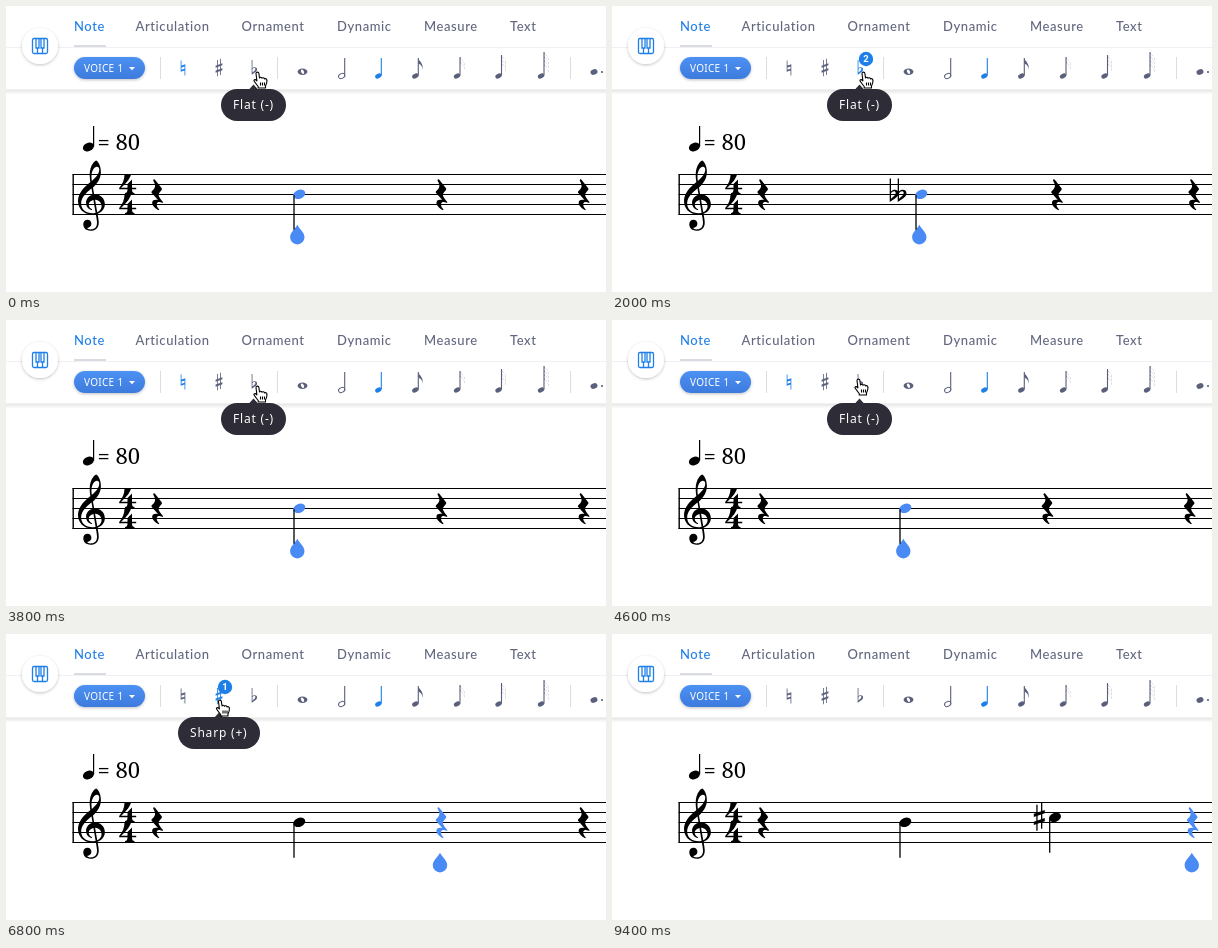
An HTML page that plays this animation: 600x286 px, repeating every 9.8 s.

```html
<!DOCTYPE html>
<html lang="en">
<head>
<meta charset="utf-8">
<style>
html, body { margin: 0; width: 100%; height: 100%; overflow: hidden; background: #fff; }
svg { display: block; width: 600px; height: 286px; }
.tab { font: 500 13px Lato, sans-serif; letter-spacing: .6px; }
.voice { font: 10px "Noto Sans", sans-serif; letter-spacing: .3px; fill: #fff; }
.tip { font: 12px "Noto Sans", sans-serif; letter-spacing: .8px; fill: #fff; }
.badge { font: bold 9.5px Roboto, sans-serif; fill: #fff; text-anchor: middle; }
.tempo { font: 22px "Noto Serif", serif; }
</style>
</head>
<body>
<svg id="stage" viewBox="0 0 600 286">
  <defs>
    <linearGradient id="pill" x2="0" y2="1"><stop stop-color="#4c91f3"/><stop offset="1" stop-color="#3d7bdd"/></linearGradient>
    <linearGradient id="shade" x2="0" y2="1"><stop stop-color="#000" stop-opacity=".11"/><stop offset="1" stop-color="#000" stop-opacity="0"/></linearGradient>
    <filter id="soft" x="-40%" y="-40%" width="180%" height="180%"><feDropShadow dx="0" dy="1" stdDeviation="1.8" flood-opacity=".25"/></filter>
    <path id="clef" fill-rule="evenodd" d="M364 -252c-245 0 -364 165 -364 339c0 202 153 345 297 464c12 10 11 12 9 24c-7 41 -14 106 -14 164c0 104 24 229 98 311c20 22 51 48 65 48c11 0 37 -28 52 -50c41 -60 65 -146 65 -233c0 -153 -82 -280 -190 -381c-6 -6 -8 -7 -6 -19l25 -145c3 -18 3 -18 29 -18c147 0 241 -113 241 -241c0 -113 -67 -198 -168 -238c-14 -6 -15 -5 -13 -17c11 -62 29 -157 29 -214c0 -170 -130 -200 -197 -200c-151 0 -190 98 -190 163c0 62 40 115 107 115c61 0 96 -47 96 -102c0 -58 -36 -85 -67 -94c-23 -7 -32 -10 -32 -17c0 -13 26 -29 80 -29c59 0 159 18 159 166c0 47 -15 134 -27 201c-2 12 -4 11 -15 9c-20 -4 -46 -6 -69 -6zM80 20c0 -139 113 -236 288 -236c20 0 40 2 56 5c15 3 16 3 14 14l-50 298c-2 11 -4 12 -20 8c-61 -17 -100 -60 -100 -117c0 -46 30 -89 72 -107c7 -3 15 -6 15 -13c0 -6 -4 -11 -12 -11c-7 0 -19 3 -27 6c-68 23 -115 87 -115 177c0 85 57 164 145 194c18 6 18 5 15 24l-21 128c-2 11 -4 12 -14 4c-47 -38 -93 -75 -153 -142c-83 -94 -93 -173 -93 -232zM470 943c-61 0 -133 -96 -133 -252c0 -26 2 -53 6 -87c2 -13 5 -13 14 -6c79 66 174 165 174 269c0 53 -19 76 -61 76zM441 117c-12 1 -13 -2 -11 -14l49 -285c2 -12 4 -12 16 -6c56 28 94 79 94 142c0 88 -67 156 -148 163z"/>
    <path id="four" d="M5.5 .2H12C10.5 5 6 10 2 13.2H8.5V9.5L13 5V13.2H17.2V14.8H13C13 17 13.6 18.4 15.5 18.6V19.8H6V18.6C7.9 18.4 8.5 17 8.5 14.8H.2V13.4C3.5 9.5 5.5 5 5.5 .2Z"/>
    <path id="rest" d="M-3.5 -15C-3 -15.5 -2.3 -15.3 -2 -14.8L4.5 -6.5C5.3 -5.4 5 -4.8 4.2 -4C2 -1.6 1.2 0 1.8 1.4C2.4 3 4 5 5.8 7.3C6.4 8.2 5.8 8.6 5 8.2C2.5 7 .2 7.4 -.2 9.3C-.6 11.3 .6 13.3 2 14.8C2.5 15.4 1.9 16 1.2 15.6C-2 13.6 -5.3 10.5 -4.8 7.7C-4.4 5.4 -1.6 4.9 1 5.6L-5.2 -1.4C-5.8 -2.2 -5.6 -2.8 -5 -3.4C-2.6 -5.6 -1.6 -7.5 -2 -9.4C-2.3 -11 -3.2 -13 -3.8 -14Z"/>
    <ellipse id="head" rx="6.2" ry="4.5" transform="rotate(-22)"/>
    <path id="flat" fill-rule="evenodd" d="M-4.6 -16H-3.3V-3C-1.5 -5.3 4.3 -5.6 4.2 -1C4.1 2.5 -.5 4.5 -4.6 7.6ZM-3.3 -1.2V4.2C-.5 2 1.4 .2 1.4 -1.5C1.4 -4 -2 -3.8 -3.3 -1.2Z"/>
    <path id="sharp" d="M-3 -12H-1.7V14H-3ZM1.7 -14H3V12H1.7ZM-5.5 -3L5.5 -6.8V-3.5L-5.5 .3ZM-5.5 5L5.5 1.2V4.5L-5.5 8.3Z" transform="translate(0 -.8)"/>
    <path id="natural" d="M-4 -13H-2.6V-4.2L4 -6.5V13H2.6V4.3L-4 6.6ZM-2.6 -1V3L2.6 1.2V-2.8Z" fill-rule="evenodd"/>
    <path id="drop" fill="#4a8af4" d="M0 -9.8C2 -6 7.2 -2 7.2 2.6A7.2 7.2 0 0 1 -7.2 2.6C-7.2 -2 -2 -6 0 -9.8Z"/>
    <path id="arrow" fill="#000" stroke="#fff" d="M0 0V14L3.1 11L5.3 16.2L7.6 15.2L5.4 10.2H9.6Z"/>
    <path id="hand" fill="#fff" stroke="#000" stroke-width="1.1" stroke-linejoin="round" d="M-1.5 1.5C-1.5 -.4 1.3 -.4 1.4 1.5L2 6C2.3 4.9 4.2 4.9 4.5 6.3C5 5.4 6.8 5.6 7 7C7.8 6.3 9.4 6.8 9.4 8.4C9.6 11 8.6 12.5 8 14V16H.7V14.5C-1 12.5 -2.5 10.5 -3.6 8.8C-3.6 7.2 -1.8 7.2 -.6 8.8ZM3 10.5V13.5M5 10.5V13.5M7 10.5V13.5"/>
  </defs>
  <g id="fixed"></g>
  <g id="live"></g>
</svg>
<script>
const BLUE = '#1f7fe8', NOTE = '#4a8af4', INK = '#5a5f7c', LOOP = 9800, STEP = 200;
const $ = id => document.getElementById(id);
const use = (id, x, y, fill = '#000', scale = 1) =>
  `<use href="#${id}" fill="${fill}" transform="translate(${x} ${y}) scale(${scale})"/>`;
const line = (x1, y1, x2, y2, stroke = '#000', w = 1.2) =>
  `<path d="M${x1} ${y1}L${x2} ${y2}" stroke="${stroke}" stroke-width="${w}"/>`;
const text = (cls, x, y, str, fill = '') =>
  `<text class="${cls}" x="${x}" y="${y}"${fill && ` fill="${fill}"`}>${str}</text>`;

// Toolbar note: small head, stem and any number of flags
function iconNote(x, top, flags, fill = INK, hollow = false) {
  let s = line(x, top, x, 69.5, fill, 1.1) +
    `<ellipse rx="3.3" ry="2.3" transform="translate(${x - 3} 70) rotate(-25)" ` +
    (hollow ? `fill="none" stroke="${fill}"/>` : `fill="${fill}"/>`);
  for (let i = 0; i < flags; i++)
    s += `<path d="M${x} ${top + i * 3.8}c.4 3.4 5.6 4.4 4.2 ${flags > 1 ? 9 : 12.5}c.2 -4 -1.6 -6 -4.2 -7z" fill="${fill}"/>`;
  return s;
}

function fixedParts() {
  const tabs = [[68, 'Note'], [129.5, 'Articulation'], [235.5, 'Ornament'], [331, 'Dynamic'], [418, 'Measure'], [504, 'Text']];
  let s = '<rect y="83.5" width="600" height="5" fill="url(#shade)"/>' +
    line(0, 41.5, 600, 41.5, '#f0f0f2', 1) + line(68, 40, 100, 40, '#d9dce3', 2);
  tabs.forEach(([x, name], i) => s += text('tab', x, 25, name, i ? '#62677f' : BLUE));
  s += '<circle cx="34" cy="40" r="18" fill="#fff" filter="url(#soft)"/>' +
    `<path d="M28 32.5H40Q41.5 32.5 41.5 34V46Q41.5 47.5 40 47.5H28Q26.5 47.5 26.5 46V34Q26.5 32.5 28 32.5ZM30 33V42H33V33M35 33V42H38V33M31.5 42V47M36.5 42V47" fill="none" stroke="${BLUE}" stroke-width="1.3"/>` +
    '<rect x="68" y="51" width="71" height="22" rx="11" fill="url(#pill)" filter="url(#soft)"/>' +
    text('voice', 78, 66, 'VOICE 1') + '<path d="M123 61H129L126 64.2Z" fill="#fff"/>';
  for (const x of [154.5, 271.5, 564.5]) s += line(x, 51, x, 73, '#dcdde4', 1);
  s += `<ellipse cx="296.5" cy="65.7" rx="4.9" ry="3.2" fill="${INK}"/><ellipse rx="1.4" ry="2.4" fill="#fff" transform="translate(296.5 65.7) rotate(-25)"/>` +
    iconNote(338.7, 52, 0, INK, true) + iconNote(375.3, 52, 0, BLUE) + iconNote(412.3, 52, 1) +
    iconNote(454, 51, 2) + iconNote(495.5, 49, 3) + iconNote(538, 46, 4) +
    `<ellipse rx="3.6" ry="2.6" transform="translate(588 66) rotate(-22)" fill="${INK}"/><circle cx="596" cy="66" r="1.1" fill="${INK}"/>`;
  s += use('head', 82.4, 141, '#000', .92) + line(87.6, 120, 87.6, 140.5) + text('tempo', 91.5, 144, '= 80', '#000');
  for (let y = 168.5; y < 210; y += 10) s += line(66.5, y, 600, y);
  return s + line(67.2, 168, 67.2, 209, '#000', 1.4) +
    '<use href="#clef" transform="translate(72 198.5) scale(.04 -.04)"/>' +
    use('four', 113, 168.5) + use('four', 113, 188.5) + use('rest', 151, 188.5);
}

const note = (x, y, fill) => use('head', x, y, fill) + line(x - 5.3, y + 1, x - 5.3, y + 35.5, '#000', 1.3);

function badge(x, scale, count) {
  return scale ? `<g transform="translate(${x + 7} 46) scale(${scale})"><circle cx="-7" cy="7" r="7.2" fill="${BLUE}"/>` +
    text('badge', -7, 10.4, count) + '</g>' : '';
}

function tooltip(x, half, label) {
  return `<path d="M${x - 5} 84L${x} 78.5L${x + 5} 84Z" fill="#2d2c37"/>` +
    `<rect x="${x - half}" y="83" width="${half * 2}" height="32" rx="16" fill="#2d2c37"/>` +
    text('tip', x - half + 12, 103, label);
}

// Pointer tip: time, x, y
const path = [[0, 251.5, 66], [4200, 251.5, 66], [4400, 248, 60], [4600, 246.5, 59], [4800, 290, 92], [5000, 390, 160],
  [5200, 432, 186], [5400, 400, 165], [5600, 263, 100], [5800, 214, 66], [6800, 214, 66], [7000, 330, 120],
  [7200, 432, 181.5], [8000, 432, 181.5], [8600, 535, 256], [LOOP, 535, 256]];

function pointer(t) {
  const i = path.findIndex(p => p[0] > t), [t0, x0, y0] = path[i - 1], [t1, x1, y1] = path[i];
  const k = (t - t0) / (t1 - t0);
  return [x0 + (x1 - x0) * k, y0 + (y1 - y0) * k];
}

function draw(t) {
  const within = (a, b) => t >= a && t < b;
  // Size of a badge that pops in at a and shrinks away at b
  const pop = (a, b) => within(a, a + STEP) || within(b, b + STEP) ? .57 : within(a, b) ? 1 : 0;
  const flats = within(400, 1600) ? 1 : within(1600, 3000) ? 2 : 0;
  const placed = t >= 8000, chosen = t < 5400 ? 0 : placed ? 2 : 1;
  const x1 = 293.3 + [0, 10.7, 16][flats];
  const x2 = 435.3 + [0, 7, 9.5][flats];
  const x3 = 577.5 + (placed ? 3 : [0, 3.3, 4.5][flats]);
  const tone = (on, off = INK) => on ? BLUE : off;

  let s = use('natural', 177, 62, tone(!chosen && !flats), .58) +
    use('sharp', 213, 62, tone(within(6600, 8000)), .62) +
    use('flat', 248.5, 64, tone(flats), .62);

  s += use('drop', [x1 - 2, x2 - 1.3, x3 - .5 + (placed ? -.2 : 0)][chosen], 228.6);
  for (let i = 0; i < flats; i++) s += use('flat', x1 - (flats > 1 ? 27 - i * 8 : 15), 188.5);
  s += note(x1, 188.3, t < 5800 ? NOTE : '#000');
  s += placed ? use('sharp', 427.3, 183.5) + note(443, 183.3, '#000')
    : use('rest', x2, 188.5, chosen === 1 ? NOTE : '#000');
  if (within(7200, 8000)) s += use('head', 437, 182.5, NOTE, .85);
  s += use('rest', x3, 188.5, chosen === 2 ? NOTE : '#000');

  s += badge(254, pop(400, 3000), flats || '') + badge(219, pop(6600, 8000), placed || t < 6800 ? '' : 1);
  if (t < 4800) s += tooltip(247.5, 32.5, 'Flat (-)');
  if (within(5800, 7000)) s += tooltip(213, 41, 'Sharp (+)');
  if (t < 9400) {
    const [x, y] = pointer(t);
    s += `<use href="#${t < 4800 || within(5800, 7000) ? 'hand' : 'arrow'}" x="${x}" y="${y}"/>`;
  }
  $('live').innerHTML = s;
}

$('fixed').innerHTML = fixedParts();
let shown = -1;
const start = performance.now();
function tick() {
  const t = Math.floor((performance.now() - start) % LOOP / STEP) * STEP;
  if (t !== shown) draw(shown = t);
  requestAnimationFrame(tick);
}
tick();
</script>
</body>
</html>
```
